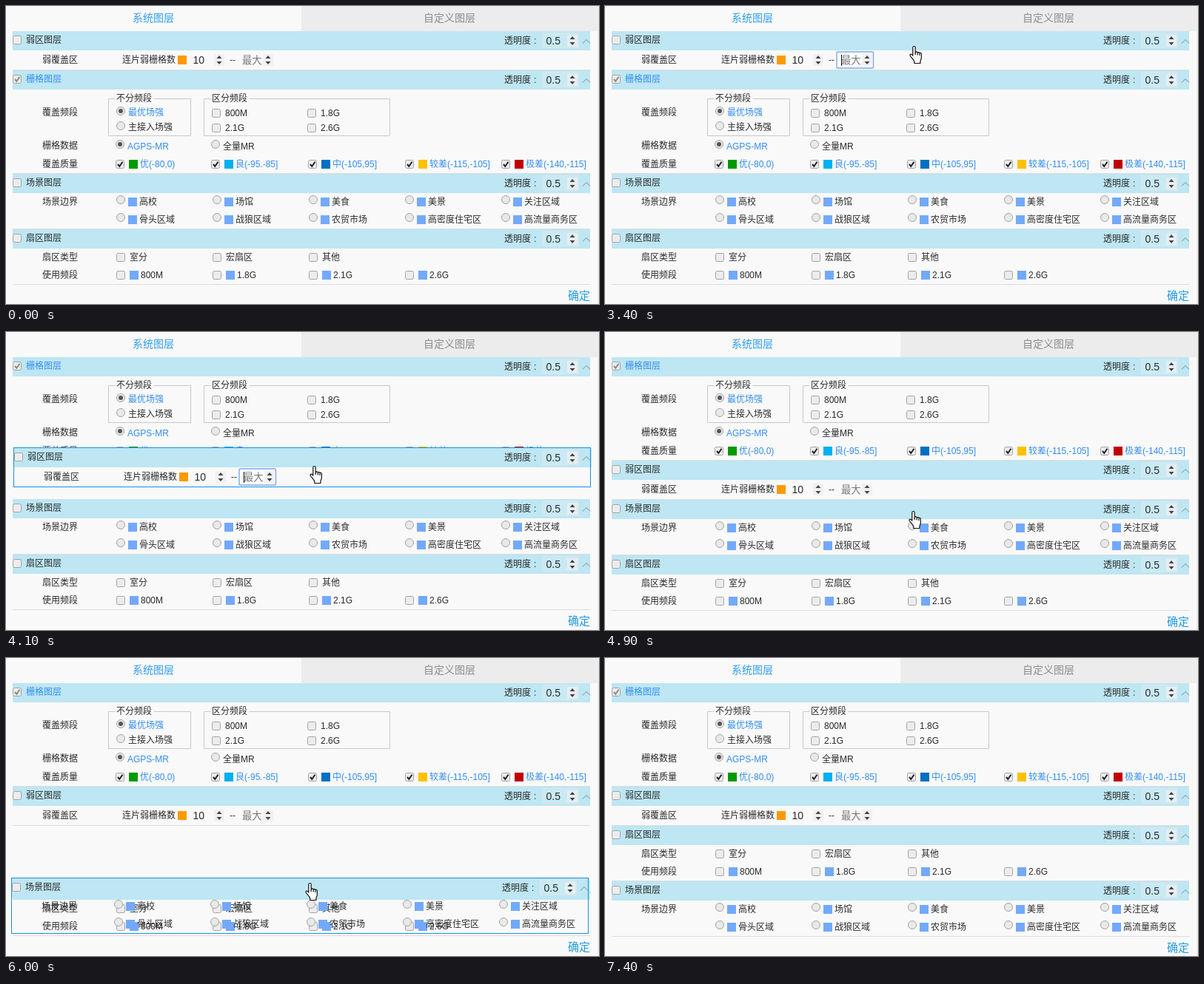
Write an HTML page that moves like this. It is 801x403 px and loops after 9.3 s.

```html
<!DOCTYPE html>
<html lang="zh-CN">
<head>
<meta charset="utf-8">
<style>
html, body { margin: 0; width: 100%; height: 100%; overflow: hidden; background: #f9f9f9; }
svg { display: block; }
text { font-family: "Liberation Sans", "Noto Sans CJK SC", "Noto Sans CJK", sans-serif; white-space: pre; }
</style>
</head>
<body>
<svg id="stage" width="801" height="403" viewBox="0 0 801 403"></svg>
<script>
const LOOP = 9300, LEFT = 9, TOP = 34, WIDTH = 780;
const INK = '#2b2b2b', BLUE = '#338df0', SWATCH = '#73a9fb';

// Drawing helpers; y is the vertical centre of each item.
const text = (x, y, s, fill = INK, size = 12, anchor = 'start') =>
  `<text x="${x}" y="${Math.round(y + size * .36)}" fill="${fill}" font-size="${size}" text-anchor="${anchor}">${s}</text>`;
const rect = (x, y, w, h, fill, extra = '') =>
  `<rect x="${x}" y="${y}" width="${w}" height="${h}" fill="${fill}" ${extra}/>`;
const line = (d, stroke, width = 1) =>
  `<path d="${d}" fill="none" stroke="${stroke}" stroke-width="${width}"/>`;
const floatRight = art => `<g class="right">${art}</g>`;
const swatch = (x, y, fill = SWATCH) => rect(x, y - 6, 12, 12, fill);
const checkbox = (x, y, tick = '') =>
  rect(x - 5.5, y - 5.5, 11, 11, '#ececec', 'rx="2" stroke="#a3a3a3"') +
  (tick && line(`M${x - 3} ${y}l2.3 2.8 4.2-6`, tick, 2));
const radio = (x, y, on) =>
  `<circle cx="${x}" cy="${y}" r="5.5" fill="#e9e9e9" stroke="#a3a3a3"/>` +
  (on ? `<circle cx="${x}" cy="${y}" r="3" fill="#555"/>` : '');
const spinner = (x, y, fill) => rect(x - 7, y - 8, 14, 16, fill) +
  `<path d="M${x - 3.5} ${y - 2}l3.5-4 3.5 4zM${x - 3.5} ${y + 2}l3.5 4 3.5-4z" fill="#444"/>`;
const fieldset = (x1, x2, legend) =>
  line(`M${x1 + 9} 38.5H${x1}V88.5H${x2}V38.5H${x1 + 61}`, '#c8c8c8') + text(x1 + 10.5, 38, legend);

function header(title, checked) {
  return rect(LEFT, 0, WIDTH, 26, '#bee6f3') +
    checkbox(15, 12, checked && '#8a8a8a') + text(27, 12, title, checked ? BLUE : INK) +
    floatRight(text(673, 13, '透明度') + text(713, 13, ':') +
      rect(724.5, 2.5, 49, 20, '#c9eaf4', 'stroke="#dce6ea"') + text(729.5, 13, '0.5', INK, 14) +
      spinner(765, 13, '#e6eef1') + line('M779 16.5l5-5 5 5', '#7d8a8e'));
}

const weakBody = text(49, 39, '弱覆盖区') + text(157, 39, '连片弱栅格数') + swatch(232, 39, '#ff9900') +
  text(252.5, 39, '10', INK, 14) + spinner(288, 39, '#f1f1f1') + text(302, 39, '--') +
  rect(313, 28, 49.5, 22, '#fff', 'id="focus" rx="2" stroke="#7da7ea" stroke-width="1.4"') +
  text(319, 39, '最大', '#777', 13.33) + spinner(354, 39, '#f1f1f1') +
  rect(319, 32, 1, 15, '#000', 'id="caret"');

const qualities = [
  [154, '#009900', '优(-80,0)'], [283, '#00b0f0', '良(-95.-85]'], [414, '#0070c0', '中(-105,95]'],
  [545, '#ffc000', '较差(-115,-105]'], [675, '#c00000', '极差(-140,-115]']
];
const gridBody = text(49, 57, '覆盖频段') +
  fieldset(138.5, 249.5, '不分频段') + radio(155, 55, true) + text(165, 57, '最优场强', BLUE) +
  radio(155, 75) + text(165, 77, '主接入场强') +
  fieldset(267.5, 518.5, '区分频段') +
  ['800M', '1.8G', '2.1G', '2.6G'].map((s, i) => {
    const x = 284 + i % 2 * 129, y = 58 + (i >> 1) * 20;
    return checkbox(x, y) + text(x + 12, y, s);
  }).join('') +
  text(49, 102, '栅格数据') + radio(154, 100, true) + text(164, 102.5, 'AGPS-MR', BLUE) +
  radio(283, 100) + text(293, 102.5, '全量MR') +
  text(49, 126.5, '覆盖质量') +
  qualities.map(([x, fill, s]) => checkbox(x, 127, '#222') + swatch(x + 12, 127, fill) + text(x + 27, 126.5, s, BLUE)).join('');

const columns = (names, draw) => names.map((s, i) => draw(155 + 130 * i, s)).join('');
const sceneRow = (y, names) => columns(names, (x, s) =>
  radio(x, y - 3) + swatch(x + 10, y) + text(x + 25, y, s));
const sceneBody = text(49, 38, '场景边界') + floatRight(
  sceneRow(38, ['高校', '场馆', '美食', '美景', '关注区域']) +
  sceneRow(62, ['骨头区域', '战狼区域', '农贸市场', '高密度住宅区', '高流量商务区']));

const sectorBody = text(49, 38, '扇区类型') +
  columns(['室分', '宏扇区', '其他'], (x, s) => checkbox(x, 38) + text(x + 12, 38, s)) +
  text(49, 62, '使用频段') +
  columns(['800M', '1.8G', '2.1G', '2.6G'], (x, s) => checkbox(x, 62) + swatch(x + 12, 62) + text(x + 27, 62, s));

const panels = {
  weak: { h: 53, art: header('弱区图层') + weakBody },
  grid: { h: 140, art: header('栅格图层', true) + gridBody },
  scene: { h: 75, art: header('场景图层') + sceneBody },
  sector: { h: 75, art: header('扇区图层') + sectorBody }
};

const panelMarkup = ([id, { h, art }]) => `<g id="${id}">${art}` +
  `<g class="rule">${line(`M${LEFT} ${h - .5}h${WIDTH}`, '#dcdcdc')}</g>` +
  `<g class="frame">${rect(LEFT - .5, -.5, WIDTH - 1, h, 'none', 'stroke="#1a90e0"')}</g></g>`;

const $ = id => document.getElementById(id);
$('stage').innerHTML =
  rect(0, 0, 801, 403, '#f9f9f9') + rect(399, 0, 400, 34, '#ececec') + rect(799, 0, 2, 403, '#ececec') +
  text(199, 16, '系统图层', '#2f9df2', 14, 'middle') + text(599, 16, '自定义图层', '#8c8c8c', 14, 'middle') +
  `<g id="confirm">${text(759, 392, '确定', '#1e9be0', 15)}</g>` +
  `<g id="list">${Object.entries(panels).map(panelMarkup).join('')}</g>` +
  `<g id="hand" stroke="#111" stroke-width="1.2" stroke-linejoin="round">
    <path fill="#fff" d="M4.8 13V2.2a1.7 1.7 0 0 1 3.4 0V9c.3-1.6 2.9-1.4 3 .3.6-1.2 2.6-.9 2.7.6.6-1 2.4-.7 2.4 1.1V16c0 2-1.2 3.5-1.4 5v2.5H6.8V21C5.5 18 2.5 15.5 1.2 13.2c-.8-1.6 1-2.8 2.2-1.6z"/>
    <path fill="none" d="M8.2 9v3M11.2 9.5v3M13.9 10.5v2.5"/></g>`;

for (const [id, p] of Object.entries(panels)) {
  p.el = $(id);
  p.floats = p.el.querySelectorAll('.right');
  for (const part of ['rule', 'frame']) p[part] = p.el.querySelector('.' + part);
}

// Tracks: [time, x, y]
const approach = [[1200, 751, 86], [1400, 640, 70], [1600, 500, 48], [1700, 440, 42], [1900, 388, 60],
  [2400, 388, 60], [2500, 396, 57], [2700, 422, 51], [2900, 411, 55], [3300, 411, 55], [3400, 411, 54], [3500, 411, 54]];
const between = [[4600, 409, 200], [4700, 409, 212], [4900, 410, 242], [5100, 406, 235]];
const leave = [[6700, 399, 346], [7300, 398, 398]];
const drags = [
  { id: 'weak', from: 3600, to: 4600, grip: [400, 25],
    track: [[3600, 9, 36], [3700, 7, 52], [3800, 5, 78], [4000, 12, 138], [4100, 10, 156], [4300, 9, 172], [4400, 9, 176]] },
  { id: 'scene', from: 5200, to: 6700, grip: [397, 7],
    track: [[5200, 9, 228], [5300, 8, 243], [5500, 6, 284], [5700, 6, 294], [5900, 6, 294], [6000, 7, 297], [6200, 4, 328], [6500, 2, 338]] }
];

function along(track, t) {
  const next = track.findIndex(k => k[0] > t);
  if (next < 0) return track.at(-1).slice(1);
  if (next === 0) return track[0].slice(1);
  const [a, b] = [track[next - 1], track[next]];
  const u = (t - a[0]) / (b[0] - a[0]);
  return [1, 2].map(i => Math.round(a[i] + (b[i] - a[i]) * u));
}

const move = (el, x, y) => el.setAttribute('transform', `translate(${x} ${y})`);
const show = (el, on) => el.setAttribute('visibility', on ? 'visible' : 'hidden');

function render(time) {
  const t = Math.floor(time / 100) * 100;
  const drag = drags.find(d => t >= d.from && t < d.to);
  const order = [...(t < 4000 ? ['weak', 'grid'] : ['grid', 'weak']),
    ...(t < 6300 ? ['scene', 'sector'] : ['sector', 'scene'])];
  const box = drag && along(drag.track, t);

  let y = TOP;
  for (const id of order) {
    const p = panels[id], held = drag && drag.id === id;
    if (held) move(p.el, box[0] - LEFT + 1, box[1] + 1);
    else move(p.el, 0, y);
    // The held panel's border narrows its content by 2px.
    p.floats.forEach(el => move(el, held ? -2 : 0, 0));
    show(p.frame, held);
    show(p.rule, !held);
    y += held ? p.h - 1 : p.h;
  }
  if (drag) {
    const el = panels[drag.id].el;
    if ($('list').lastElementChild !== el) $('list').append(el);
  }
  move($('confirm'), 0, drag ? -1 : 0);

  const focused = t >= 2100 && t < 4600;
  show($('focus'), focused);
  show($('caret'), focused && Math.floor((t - 2100) / 500) % 2 === 0);

  const path = t < 3600 ? approach : t < 5200 ? between : leave;
  const hand = drag ? box.map((v, i) => v + drag.grip[i]) : along(path, t);
  show($('hand'), t >= 1200 && t < 7400);
  move($('hand'), ...hand);
}

const start = performance.now();
function tick() {
  render((performance.now() - start) % LOOP);
  requestAnimationFrame(tick);
}
tick();
</script>
</body>
</html>
```
